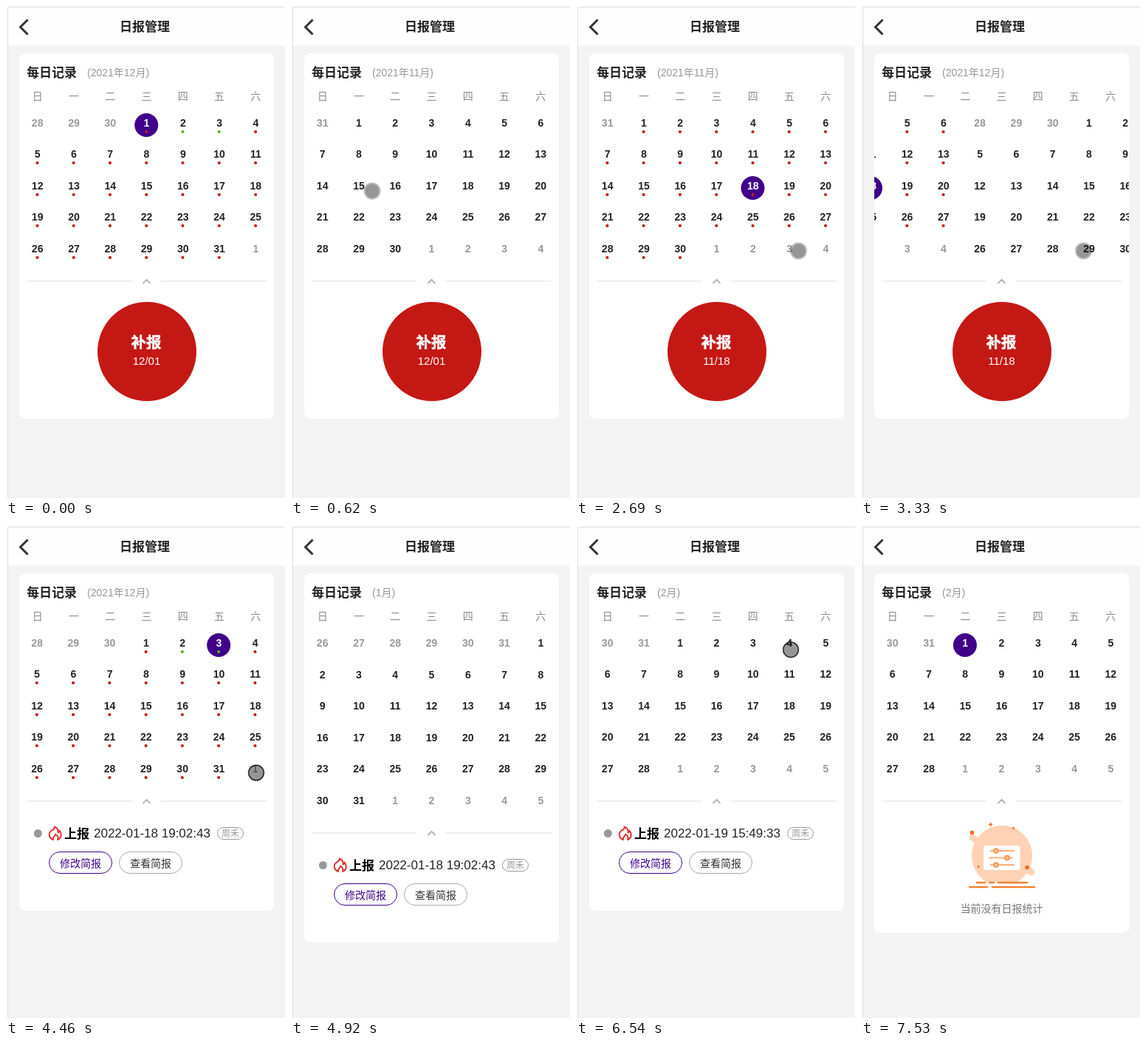
An HTML page for the animation above (8000 ms loop, 378 by 665 pixels).

```html
<!DOCTYPE html>
<html lang="zh">
<head>
<meta charset="utf-8">
<title>日报管理</title>
<style>
  html, body { margin: 0; width: 100%; height: 100%; overflow: hidden; background: #f3f3f3; }
  svg { display: block; width: 100%; height: 100%; }
  text { font: 14px "Liberation Sans", "Noto Sans CJK SC", "Noto Sans CJK", sans-serif; fill: #222; }
  .b { font-weight: 700; }
  .mid { text-anchor: middle; }
  .big { font-size: 17px; }
  .mute { fill: #999; }
  .inv { fill: #fff; }
  #cursor { mix-blend-mode: multiply; }
</style>
</head>
<body>
<svg viewBox="0 0 378 665">
  <defs>
    <clipPath id="clip"><rect id="clipBox" x="18" y="138" width="345" height="215"/></clipPath>
    <path id="star" d="M0-3.500L1-1 3.500 0 1 1 0 3.500-1 1-3.500 0-1-1Z" fill="#f96a16"/>
    <g id="slider">
      <path d="M176 0H207" stroke="#fdae7c" stroke-width="2" stroke-linecap="round"/>
      <circle cx="183" r="3" fill="#ffc49d" stroke="#fb8b3f" stroke-width="1.500"/>
    </g>
  </defs>
  <rect width="378" height="665" fill="#f3f3f3"/>
  <rect width="378" height="54" fill="#fefefe"/>
  <rect width="2" height="665" fill="#fcfcfc"/>
  <path d="M2.5 665V1.5H378" fill="none" stroke="#ddd"/>
  <path d="M29.5 18.5L19.5 28.5L29.5 38.5" fill="none" stroke="#333" stroke-width="3"/>
  <text class="b big mid" x="188" y="34">日报管理</text>

  <rect id="card" x="18" y="64" width="345" rx="8" fill="#fff"/>
  <text class="b big" x="28" y="96">每日记录</text>
  <text id="month" class="mute" x="110" y="95"></text>
  <g id="week"></g>
  <g clip-path="url(#clip)"><g id="track"></g></g>

  <g id="lower">
    <path d="M28 372H171M210 372H353" stroke="#eee" stroke-width="2"/>
    <path d="M185.5 375L190.5 370L195.5 375" fill="none" stroke="#b5b5b5" stroke-width="2"/>

    <g id="missing">
      <circle cx="191" cy="467" r="67" fill="#c41815"/>
      <text class="b mid inv" x="190" y="462" style="font-size:20.5px" stroke="#fff" stroke-width=".5">补报</text>
      <text id="day" class="mid inv" x="190.5" y="485" style="font-size:15px"></text>
    </g>

    <g id="report">
      <circle cx="43.3" cy="415.5" r="5.5" fill="#999"/>
      <path d="M64 424C57 421 57.500 414 62 411.500C66 409.500 66 408 65.500 406.500C70 408 71 411.500 70.500 414.500C72 414 72.500 412.500 72.500 411.500C76 416 75.500 421.500 70 424C71.500 421 70 418.500 67 416.500C67 419.500 62.500 420.500 64 424Z" fill="none" stroke="#e33131" stroke-width="2" stroke-linejoin="round"/>
      <text class="b big" x="79" y="421.5" style="fill:#000">上报</text>
      <text id="stamp" class="big" x="119" y="421"></text>
      <rect x="286.5" y="407.5" width="35" height="16" rx="8" fill="none" stroke="#999"/>
      <text class="mute mid" x="304" y="420" style="font-size:12px">周禾</text>
      <rect x="58.5" y="440.5" width="85" height="29" rx="14.5" fill="none" stroke="#40008a"/>
      <text class="mid" x="101" y="460.5" style="fill:#40008a">修改简报</text>
      <rect x="153.5" y="440.5" width="85" height="29" rx="14.5" fill="none" stroke="#aaa"/>
      <text class="mid" x="196" y="460.5" style="fill:#333">查看简报</text>
    </g>

    <g id="empty">
      <path d="M151 421L160 428M221 462L231 468" stroke="#ffd2b5" stroke-width="9" stroke-linecap="round"/>
      <path d="M170 481A41 41 0 1 1 212 481Z" fill="#ffd2b5"/>
      <rect x="166" y="432" width="49.5" height="33" rx="4" fill="#fff"/>
      <use href="#slider" y="439"/>
      <use href="#slider" transform="translate(381 448.5) scale(-1 1)"/>
      <use href="#slider" y="458"/>
      <circle cx="150.5" cy="414.5" r="2.8" fill="#f96a16"/>
      <circle cx="225" cy="461.5" r="2.8" fill="#f96a16"/>
      <use href="#star" x="175.5" y="403.5"/>
      <use href="#star" transform="translate(206.5 408.5) scale(.7)"/>
      <use href="#star" transform="translate(159 460.5) scale(.7)"/>
      <path d="M157 482H168M174 482H180M186 482H225M147 488H171M178 488H235" stroke="#f98232" stroke-width="2.5" stroke-linecap="round"/>
      <text class="mid" x="190.5" y="522" style="fill:#777">当前没有日报统计</text>
    </g>
  </g>

  <g id="cursor">
    <circle r="10.5" fill="#969696" stroke="#bdbdbd" stroke-width="2"/>
    <circle id="press" r="10.2" fill="none" stroke="#111" stroke-width="1.2"/>
  </g>
</svg>
<script>
const LOOP = 8000, PAGE = 345, COL = PAGE / 7, DRAG = 100, REACH = 250, LOAD = 160;
const NOV = 0, DEC = 1, JAN = 2, FEB = 3, MONTHS = [NOV, DEC, JAN, FEB];
const TITLES = ['(2021年11月)', '(2021年12月)', '(1月)', '(2月)'];
const GREEN = { [DEC]: [2, 3], [JAN]: [1, 8, 21] };
const TODAY = 21;
const CARD = { missing: 494, report: 456, empty: 486 };

const swipes = [
  { arrive: 0, press: 30, release: 250, end: 520, from: DEC, to: NOV, x: 110, y: 250 },
  { arrive: 2690, press: 2780, release: 3144, end: 3510, from: NOV, to: DEC, x: 301.5, y: 331 },
  { arrive: 4130, press: 4460, release: 4620, end: 4900, from: DEC, to: JAN, x: 339, y: 333.5 },
  { arrive: 5250, press: 5430, release: 5666, end: 6110, from: JAN, to: FEB, x: 288.5, y: 360 }
];
const taps = [[0, DEC, 1], [1250, NOV, 3], [1650, NOV, 10], [2200, NOV, 17], [2500, NOV, 18],
  [3940, DEC, 3], [5130, JAN, 1], [6560, FEB, 4], [7100, FEB, 10], [7520, FEB, 1]];
const hidden = [[0, 30], [1750, 1960], [4880, 4960], [7530, LOOP]];

const $ = id => document.getElementById(id);
const smooth = u => u * u * (3 - 2 * u);
const lerp = (a, b, u) => a + (b - a) * u;
const drift = s => DRAG * Math.sign(s.to - s.from);
const swipeAt = t => swipes.filter(s => s.press <= t).pop();
const firstDay = m => new Date(2021, 10 + m, 1).getDay();
const daysIn = m => new Date(2021, 11 + m, 0).getDate();
const rowsIn = m => Math.ceil((firstDay(m) + daysIn(m)) / 7);

function cell(m, d, pitch) {
  const i = firstDay(m) + d - 1;
  return [18 + (i % 7 + .5) * COL, Math.round(158 + Math.floor(i / 7) * pitch)];
}

function dotColor(m, d) {
  if (GREEN[m] && GREEN[m].includes(d)) return '#5cb31a';
  return m === FEB || m === JAN && d > TODAY ? null : '#c41815';
}

// The cursor reaches for each tap and swipe, and returns after a swipe
function buildPath() {
  const path = [[0, swipes[0].x, swipes[0].y]];
  const reach = (t, x, y) => {
    const [t0, x0, y0] = path[path.length - 1];
    path.push([Math.max(t0, t - REACH), x0, y0], [t, x, y]);
  };
  const moves = taps.slice(1).map(([t, m, d]) => {
    const [x, y] = cell(m, d, 42.5);
    return { t, go: () => reach(t, x + 2, y + 6) };
  }).concat(swipes.map(s => ({
    t: s.arrive,
    go() {
      reach(s.arrive, s.x, s.y);
      path.push([s.press, s.x, s.y], [s.release, s.x - drift(s), s.y], [(s.release + s.end) / 2, s.x, s.y]);
    }
  })));
  moves.sort((a, b) => a.t - b.t).forEach(m => m.go());
  return path;
}
const path = buildPath();

function cursorAt(t) {
  const i = path.findIndex(p => p[0] > t);
  if (i < 0) return path[path.length - 1].slice(1);
  const [t0, x0, y0] = path[i - 1], [t1, x1, y1] = path[i];
  const u = smooth((t - t0) / (t1 - t0));
  return [lerp(x0, x1, u), lerp(y0, y1, u)];
}

function scrollAt(t) {
  const s = swipeAt(t);
  if (!s) return DEC * PAGE;
  const start = s.from * PAGE, pulled = start + drift(s);
  if (t < s.release) return lerp(start, pulled, (t - s.press) / (s.release - s.press));
  return lerp(pulled, s.to * PAGE, smooth(Math.min(1, (t - s.release) / (s.end - s.release))));
}

function drawMonth(m, pick, dots, pitch) {
  const days = daysIn(m), start = 1 - firstDay(m), before = daysIn(m - 1);
  let out = '';
  for (let d = start; d < start + rowsIn(m) * 7; d++) {
    const inside = d > 0 && d <= days, [x, y] = cell(m, d, pitch);
    const on = inside && pick[1] === m && pick[2] === d;
    const today = dots && m === JAN && d === TODAY;
    if (on || today) out += `<circle cx="${x - .3}" cy="${y + 3}" r="16" fill="${on ? '#40008a' : '#c6b3dc'}"/>`;
    const label = inside ? d : d < 1 ? before + d : d - days;
    out += `<text class="b mid ${on ? 'inv' : inside ? '' : 'mute'}" x="${x}" y="${y + 5}">${label}</text>`;
    const color = dots && inside && dotColor(m, d);
    if (color) out += `<circle cx="${x - .3}" cy="${y + 12}" r="2.1" fill="${color}"/>`;
  }
  return `<g transform="translate(${m * PAGE} 0)">${out}</g>`;
}

$('week').innerHTML = [...'日一二三四五六'].map((c, i) =>
  `<text class="mid" style="fill:#8c8c8c" x="${18 + (i + .5) * COL}" y="127">${c}</text>`).join('');

let lastKey = '';
function drawState(t) {
  const s = swipeAt(t), pick = taps.filter(p => p[0] <= t).pop();
  const month = !s ? DEC : t < s.release ? s.from : s.to;
  const dotted = !s ? DEC : t < s.end + LOAD ? s.from : s.to;
  const key = [month, dotted, pick].join();
  if (key === lastKey) return;
  lastKey = key;

  const color = dotColor(pick[1], pick[2]);
  const panel = !color ? 'empty' : GREEN[pick[1]]?.includes(pick[2]) ? 'report' : 'missing';
  const extra = (rowsIn(month) - 5) * 43;
  // a six-row month is squeezed a little while a shorter one takes its place
  const pitch = m => rowsIn(m) === 5 ? 42.4 : month > m ? 42 : 42.6;
  $('track').innerHTML = MONTHS.map(m => drawMonth(m, pick, m === dotted, pitch(m))).join('');
  $('month').textContent = TITLES[month];
  $('card').setAttribute('height', CARD[panel] + extra);
  $('clipBox').setAttribute('height', 215 + extra);
  $('lower').setAttribute('transform', `translate(0 ${extra})`);
  for (const id in CARD) $(id).style.display = id === panel ? '' : 'none';
  $('day').textContent = `${11 + pick[1]}/${String(pick[2]).padStart(2, '0')}`;
  $('stamp').textContent = pick[1] < JAN ? '2022-01-18 19:02:43' : '2022-01-19 15:49:33';
}

function draw(t) {
  drawState(t);
  $('track').setAttribute('transform', `translate(${-scrollAt(t)} 0)`);
  $('cursor').setAttribute('transform', `translate(${cursorAt(t)})`);
  $('cursor').style.display = hidden.some(([a, b]) => t >= a && t < b) ? 'none' : '';
  const down = taps.some(([at]) => Math.abs(t - at) < 50) || swipes.some(s => t >= s.press && t < s.release);
  $('press').style.display = down ? '' : 'none';
}

const start = performance.now();
function tick() {
  draw((performance.now() - start) % LOOP);
  requestAnimationFrame(tick);
}
tick();
</script>
</body>
</html>
```
